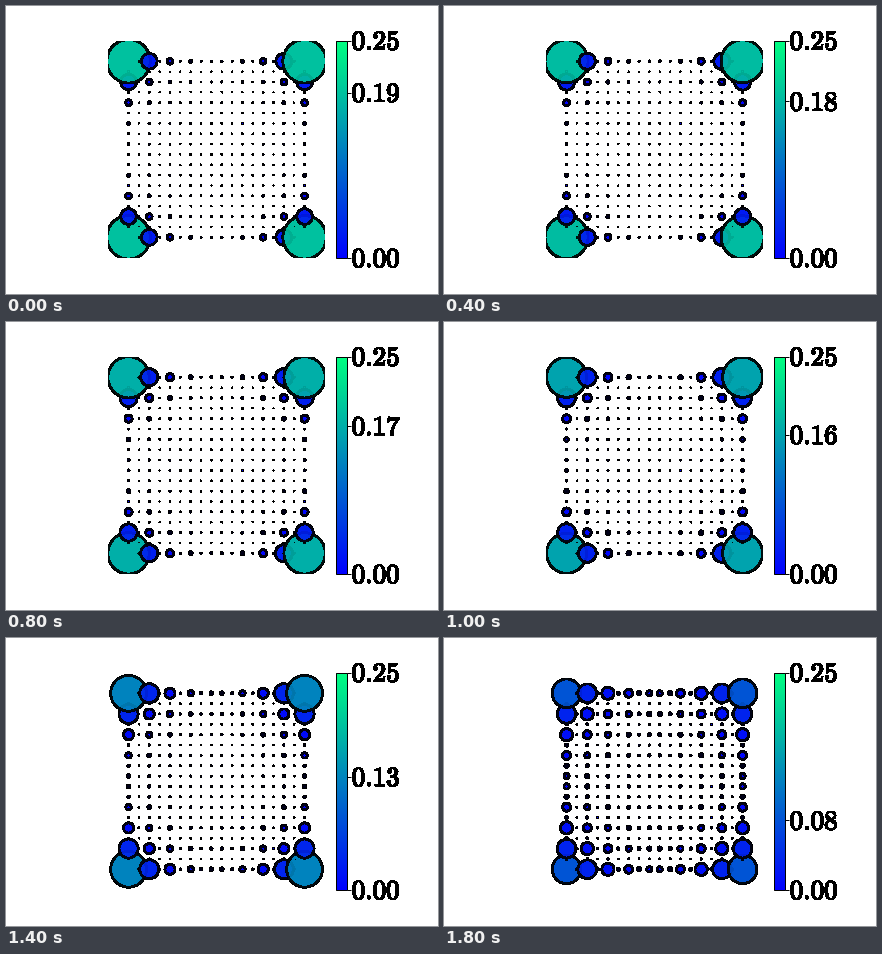
Write a matplotlib script that moves like this. It is 432 by 288 pixels and loops after 2 s.

```python
import numpy as np
import matplotlib.pyplot as plt
from matplotlib.animation import FuncAnimation
from matplotlib.patheffects import withStroke

plt.rcParams["mathtext.fontset"] = "cm"

SITES = 18
FRAMES = 10
VMAX = 0.25
AREA = 10000  # marker area per unit of density
RIM = 1.8
SPECK = 1.3  # diameter of a site with no density


def density(frame):
    """Corner-state density of a dimerised square lattice."""
    delta = 0.468 * np.cos(0.123 * frame)
    ratio = (1 - delta) / (1 + delta)
    cell = np.arange(SITES // 2)
    chain = np.zeros(SITES)
    chain[::2] = ratio ** (2 * cell)
    chain[1::2] = chain[::2][::-1]
    chain /= chain.sum()
    return np.outer(chain, chain).ravel()


fig = plt.figure(figsize=(6, 4), dpi=72, facecolor="white")


def pixel_axes(left, width):
    return fig.add_axes([left / 432, 0.125, width / 432, 0.755])


ax = pixel_axes(101.84, 217.44)
ax.set(xlim=(-2, 19), ylim=(-2, 19))
ax.axis("off")
x, y = np.meshgrid(np.arange(SITES), np.arange(SITES))


def circles(alpha):
    return ax.scatter(x, y, c=density(0), cmap="winter", vmin=0, vmax=VMAX,
                      alpha=alpha, edgecolors="black", linewidths=RIM,
                      antialiased=False)


# The solid layer keeps full colour; the glassy one shows overlaps.
specks = ax.scatter(x, y, c="black", linewidths=0, antialiased=False)
layers = [circles(1), circles(0.9)]

bar = fig.colorbar(layers[0], cax=pixel_axes(330.08, 10.87))
bar.outline.set_linewidth(1)
bar.ax.tick_params(length=4, width=1, labelright=False)


def value_label(value):
    return bar.ax.annotate(f"${value:.2f}$", (1, value),
                           xycoords=("axes fraction", "data"),
                           xytext=(4.7, -9), textcoords="offset points",
                           va="baseline", fontsize=27, antialiased=False,
                           annotation_clip=False,
                           path_effects=[withStroke(linewidth=0.6,
                                                    foreground="black")])


value_label(0)
value_label(VMAX)
peak_label = value_label(0.19)


def update(frame):
    p = density(frame)
    size = AREA * p
    specks.set_sizes((np.sqrt(size) + SPECK) ** 2)
    for layer in layers:
        layer.set_sizes(size)
        layer.set_array(p)
    peak = round(p.max(), 2)
    bar.set_ticks([0, peak, VMAX])
    peak_label.xy = (1, peak)
    peak_label.set_text(f"${peak:.2f}$")
    return [specks, *layers, peak_label]


anim = FuncAnimation(fig, update, frames=FRAMES, interval=200,
                     repeat=True, repeat_delay=0, blit=False)
plt.show()
```
